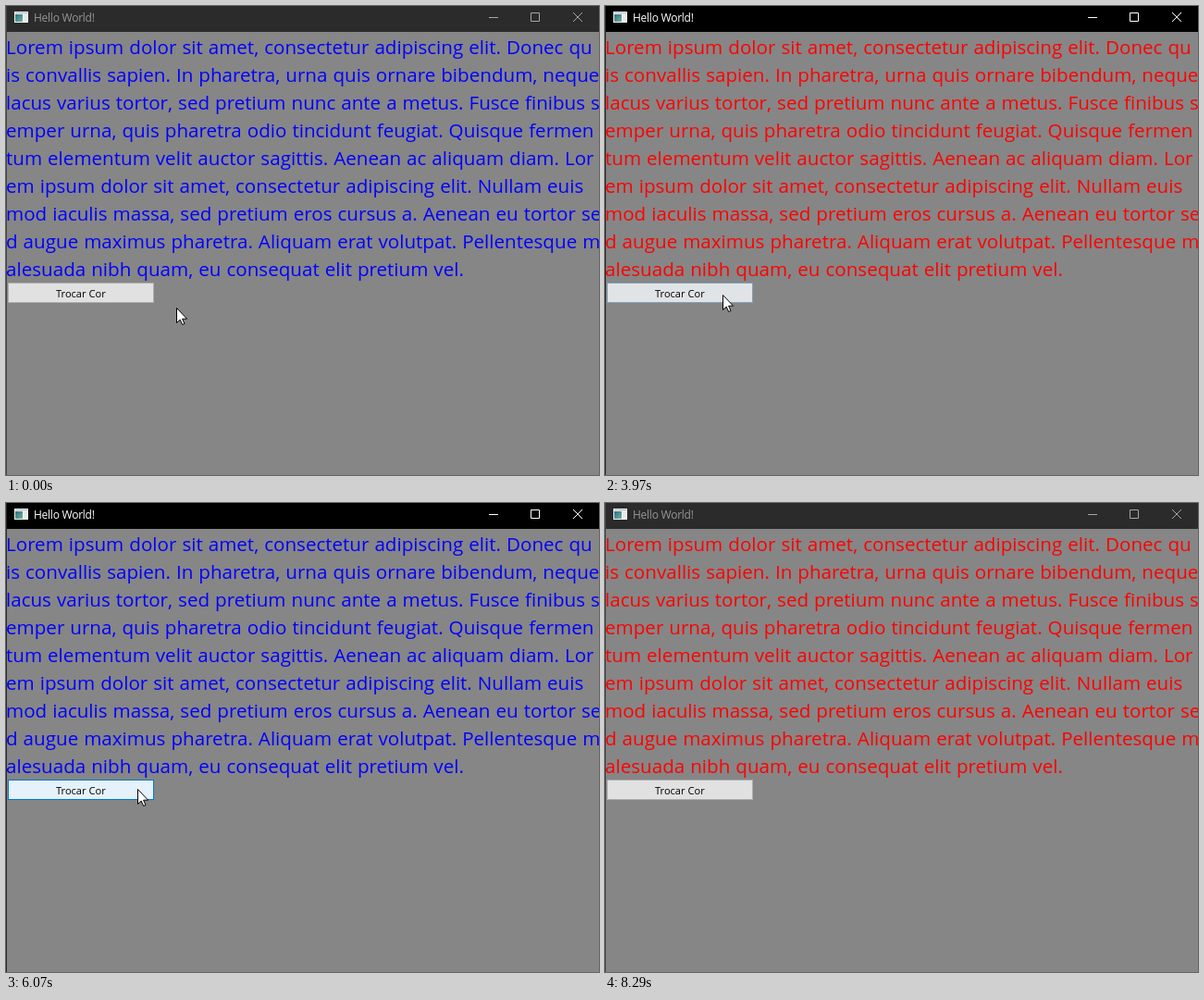
An HTML page that plays this animation: 641x507 px, repeating every 8.31 s.

```html
<!DOCTYPE html>
<html lang="pt">
<head>
<meta charset="utf-8">
<title>Hello World!</title>
<style>
  html, body { margin: 0; width: 100%; height: 100%; overflow: hidden; background: #868686; }
  svg { display: block; }
  text { font-family: "Open Sans", "Noto Sans", sans-serif; white-space: pre; }
  #title { font-size: 12px; letter-spacing: -0.25px; }
  #body { font-size: 20.6px; word-spacing: 0.65px; }
</style>
</head>
<body>
<svg width="641" height="507" viewBox="0 0 641 507">
  <defs>
    <linearGradient id="teal" x2="1" y2="1">
      <stop stop-color="#2f6f86"/><stop offset="1" stop-color="#6fb59a"/>
    </linearGradient>
  </defs>
  <rect width="641" height="507" fill="#868686"/>
  <rect id="bar" width="641" height="28"/>
  <rect id="edge" width="1" height="507"/>

  <rect x="9" y="6" width="15" height="12" fill="#f4f4f4"/>
  <rect x="10" y="7" width="13" height="1" fill="#a9b4bd"/>
  <rect x="10" y="9" width="8" height="8" fill="url(#teal)"/>
  <rect x="19" y="9" width="4" height="8" fill="#e6ebec"/>

  <text id="title" x="30" y="17">Hello World!</text>
  <path id="controls" fill="none" d="M522 12.5h10M567.5 7.5h9v9h-9zM613 7l10 10M623 7l-10 10"/>

  <g id="body"></g>

  <rect x="2.5" y="299.5" width="157" height="21" fill="#e1e1e1" stroke="#adadad"/>
  <rect id="hover" x="2.5" y="299.5" width="157" height="21" fill="#e5f1fb" stroke="#0078d7"/>
  <rect id="press" x="2.5" y="299.5" width="157" height="21" fill="#cce4f7" stroke="#005499"/>
  <text x="54" y="315" font-size="11.1">Trocar Cor</text>

  <path id="cursor" fill="#fff" stroke="#000" d="M.5.5v16l3.7-3.4 2.5 5.4 2.3-1-2.4-5.3h5z"/>
</svg>
<script>
const LOOP = 8310;
const LINES = [
  "Lorem ipsum dolor sit amet, consectetur adipiscing elit. Donec qu",
  "is convallis sapien. In pharetra, urna quis ornare bibendum, neque",
  "lacus varius tortor, sed pretium nunc ante a metus. Fusce finibus s",
  "emper urna, quis pharetra odio tincidunt feugiat. Quisque fermen",
  "tum elementum velit auctor sagittis. Aenean ac aliquam diam. Lor",
  "em ipsum dolor sit amet, consectetur adipiscing elit. Nullam euis",
  "mod iaculis massa, sed pretium eros cursus a. Aenean eu tortor se",
  "d augue maximus pharetra. Aliquam erat volutpat. Pellentesque m",
  "alesuada nibh quam, eu consequat elit pretium vel."
];

const [edge, bar, title, controls, body, hover, press, cursor] =
  ["edge", "bar", "title", "controls", "body", "hover", "press", "cursor"]
    .map(id => document.getElementById(id));

body.innerHTML = LINES.map((line, i) => `<text x="0" y="${52 + 30 * i}">${line}</text>`).join("");

const within = (t, from, to) => t >= from && t < to;
const ramp = (t, from, to) => Math.min(1, Math.max(0, (t - from) / (to - from)));
const ease = (t, from, to) => Math.sin(ramp(t, from, to) * Math.PI / 2);
const dip = (t, from, to) => Math.sin(ramp(t, from, to) * Math.PI);

// Drift, glide onto the button, two dips below it, then leave after the last click
function cursorAt(t) {
  const drift = ramp(t, 400, 2050);
  const glide = ease(t, 2050, 2430);
  const shift = ramp(t, 5230, 5920);
  const leave = ramp(t, 7350, 7490);
  return [
    184 - 3 * drift - 54 * glide + 15 * shift + 14 * leave,
    326 - drift - 13 * glide - 3 * shift + 23 * leave
      + 30 * dip(t, 3450, 3970) + 73 * dip(t, 5060, 5800)
  ].map(Math.round);
}

// The highlight fades in and out as the cursor enters and leaves
function hoverAt(t) {
  return ramp(t, 2310, 2710) - ramp(t, 3500, 3850)
    + ramp(t, 3850, 4370) - ramp(t, 5130, 5640)
    + ramp(t, 5640, 6070) - ramp(t, 7490, 8020);
}

function draw(t) {
  const active = within(t, 2860, 8290);
  const red = within(t, 2860, 4960) || t >= 7490;
  const pressed = within(t, 4830, 4960) || within(t, 7350, 7490);

  bar.setAttribute("fill", active ? "#000" : "#2b2b2b");
  edge.setAttribute("fill", active ? "#2a2a2a" : "#454545");
  title.setAttribute("fill", active ? "#fff" : "#959595");
  controls.setAttribute("stroke", active ? "#fff" : "#a5a5a5");
  body.setAttribute("fill", red ? "#f00" : "#00f");
  hover.setAttribute("opacity", hoverAt(t));
  press.setAttribute("opacity", pressed ? 1 : 0);
  cursor.setAttribute("transform", `translate(${cursorAt(t)})`);
  cursor.setAttribute("opacity", t < 7620 ? 1 : 0);
}

const start = performance.now();
function tick() {
  draw((performance.now() - start) % LOOP);
  requestAnimationFrame(tick);
}
tick();
</script>
</body>
</html>
```
